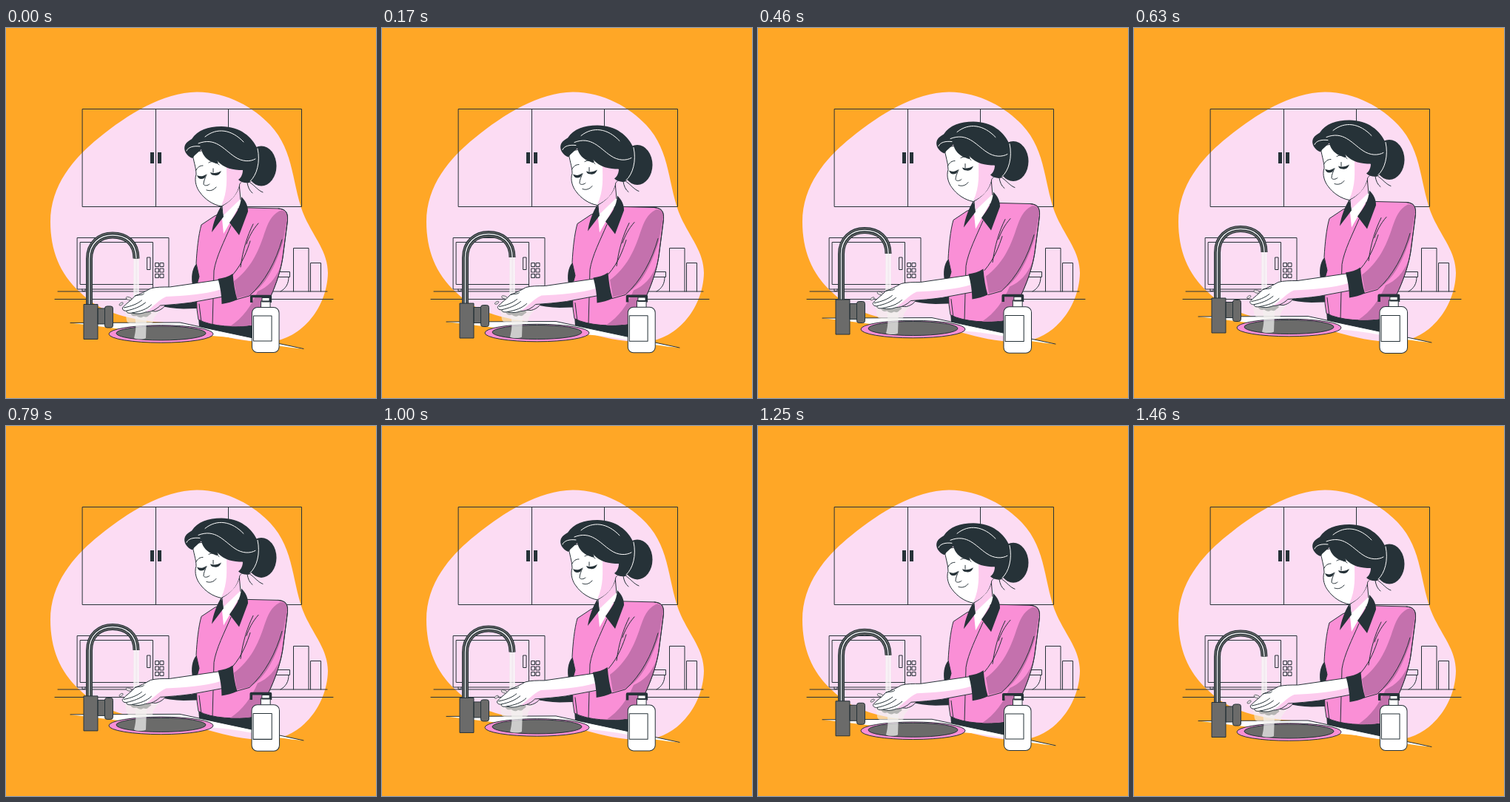
Recreate the animation shown at these times as an HTML page. Size 500 by 500 pixels, loop 1500 ms.

```html
<!DOCTYPE html>
<html lang="en">
<head>
<meta charset="utf-8">
<title>Washing hands</title>
<style>
html, body { margin: 0; width: 100%; height: 100%; overflow: hidden; background: #ffa726; }
svg { display: block; width: 100vw; height: 100vh; }
.ln { fill: none; stroke: #263238; stroke-width: 1; stroke-linecap: round; stroke-linejoin: round; }
.ol { stroke: #263238; stroke-width: 1; stroke-linejoin: round; }
.hi { fill: none; stroke: #fff; stroke-width: 1; stroke-linecap: round; }
.dark { fill: #263238; }
.white { fill: #fff; }
.pink { fill: #fa8fd6; }
.pale { fill: #fcdcf3; }
.blush { fill: #fdcbee; }
.shade { fill: #c471ad; }
.grey { fill: #6b6b6a; }
</style>
</head>
<body>
<svg viewBox="0 0 500 500">
  <rect width="500" height="500" fill="#ffa726"/>
  <path class="pale" d="M258 86.5C300 86.5 335 108 357 131C391 167 386 215 404 256C417 284 435 303 435 331C434 380 396 424 352 424C290 424 262 400 200 397C150 391 122 379 100 357C72 332 60 299 60 262C60 213 91 176 126 148C164 117 212 87 258 86.5Z"/>

  <g id="room" class="ln">
    <path d="M103.500 109.5H399.5V241.5H103.5ZM202.500 109.5V241.5M300.500 109.5V241.5"/>
    <path d="M96.500 283.5H220V353H96.500ZM100.500 289.5H198.500V346.5H100.500ZM198.500 346.5V353M191 310H195V326.500H191ZM103 353V355.500H107V353M208 353V355.500H212V353"/>
    <path d="M70 356H434M66 366.500H442"/>
    <path d="M364 329.500H383.500V336.500H364M382 336.500C382 346 378 352 371 356"/>
    <path d="M388.500 356V297.500H409V356M411.500 356V317.500H425.500V356"/>
  </g>
  <path class="dark" d="M195 168h5v15h-5zM205 168h5v15h-5z"/>

  <g id="scene">
    <!-- far arm -->
    <path class="dark" d="M257 319C251 326 250 338 252 347L261 345V320Z"/>
    <path class="dark" d="M206 374L290 364L290 378L240 379.500C228 379 214 378 206 374Z"/>

    <!-- body -->
    <path class="dark" d="M260 390L340 398V424L261 404Z"/>
    <path class="pink ol" d="M264 266L282 254L300 246L326 243L368 244C378 245 381 249 380.500 260L374 310C369 343 350 384 334 402C312 405 278 404 260 394L258 380L257 350L261 336L257 318C258 300 260 280 264 266Z"/>
    <path class="shade" d="M380 258C380.500 249 377 245.500 370 247C358 253 354 264 349 278C341 303 330 326 308 342L312 365L329 361C350 350 364 322 374 290Z"/>
    <path class="shade" d="M340 356C332 375 320 392 303 403C314 403.500 324 403 334 401C349 385 364 355 371 322C364 340 354 350 340 356Z"/>
    <path class="ln" d="M304 267C295 288 284 309 281 328L279 402M334 265C326 281 320 300 317 323M341 264C333 273 328 283 325 292M306 334C320 318 326 300 330 288M373 286C365 315 350 343 329 362L311 367M261 373L264 398"/>
    <path class="ln" d="M368 244C378 245 381 249 380.500 260L374 310C369 343 350 384 334 402"/>

    <!-- neck -->
    <path class="white" d="M292 228L317 208L318 236L294 278L292 258Z"/>
    <path class="blush" d="M292 236L298 190L318 207L317 231L294 253Z"/>
    <path class="ln" d="M292 240L293 253M315 210L317 232"/>
    <path class="dark" d="M291 240L294 255L278 276C280 263 285 250 291 240ZM318 228C324 234 327 240 327 248L315 280L302 263C310 252 317 243 318 228Z"/>

    <!-- head -->
    <path class="white ol" d="M252 168C253 180 257 188 257 198C254 207 258 217 262 222C269 232 280 239 291 241C302 235 313 226 316 210C323 206 324 196 318 190L300 160Z"/>
    <path class="blush" d="M298 188C298 204 300 220 291 240C303 235 313 226 315.500 210C323 206 324 196 318 190Z"/>
    <ellipse class="dark" cx="345" cy="186.500" rx="20.500" ry="27"/>
    <path class="dark" d="M252 176C244 173 239 165 242 158C244 154 248 152 251 150C259 138 273 133 291 133C316 133 333 147 340 164C343 185 339 202 329 209C324 210 318 209 314 205C318 202 320 197 320 192C307 192 295 190 285 179C289 184 285 184 281 182C272 179 266 173 264 164C260 168 255 171 252 176Z"/>
    <path class="hi" d="M244 166C246 161 253 159 262 160M260 156C283 147 294 164 309 174C319 181 330 181 337 177M269 147C285 134 305 137 321 154M340 163C344 181 339 199 330 207"/>
    <path class="ln" d="M326 209C327 215 329 220 333 223M330 209C336 213 341 220 347 222M257 192C259 188 262 186 266 186M274 182C279 179 284 181 288 185M271 198C269 203 267 207 267 211C268 214 273 213 275 211M271 219C276 221 281 219 284 215M280 195V190"/>
    <path class="dark" d="M258 199C262 201 266 201 270 198C270 201 268 204 264 204C261 204 259 202 258 199ZM276 195C281 197 286 196 291 193C289 198 286 200 282 199C279 199 277 198 276 195Z"/>

    <!-- worktop and sink -->
    <path class="white" d="M87 398.500L235 398L402 433.500C380 432 360 428 335 423.500C309 419 296 417 278 416L165 408Z"/>
    <path class="ln" d="M87 398.500L235 398L402 433.500"/>
    <ellipse class="pink ol" cx="209.500" cy="413.500" rx="70.500" ry="11.800"/>
    <ellipse class="grey ol" cx="209.500" cy="412.500" rx="60.500" ry="9.500"/>

    <!-- running water -->
    <path d="M172.500 308H179.500L180 366H172ZM174 390H190L189 419C185 421 177 421 173 419C176 408 176 400 174 390Z" fill="#f2f2f2" opacity=".72"/>
    <path class="hi" d="M174 311V362M178.500 311V362" opacity=".7"/>

    <!-- near arm -->
    <g id="arm">
      <path d="M160 383C163 390 161 394 164 398C175 403 190 402 198 398C198 390 203 389 208 380L198 374H170Z" fill="#f4f0ee" opacity=".62"/>
      <path class="blush ol" d="M173 375C185 380 194 383 202 383C210 381 214 377 217 371L198 368Z"/>
      <path d="M163 384C167 380 194 380 196 385C195 388 193 387 192 389C189 392 187 390 185 390C181 393 178 390 176 389C172 390 169 389 168 386Z" fill="#b5b5b3"/>
      <path class="white" d="M290 340L221 350C211 350 202 350 195 352C188 356 180 360 174 362C170 367 161 373 157 378C156 381 160 383 163 382C161 385 166 386 170 385C177 387 183 386 188 384C196 384 203 380 208 375C222 374 236 373 250 371L293 363Z"/>
      <path class="blush" d="M293 363L250 371L208 375C203 380 196 384 188 384C197 378 205 368 216 363C240 362 268 360 291 353Z"/>
      <path class="ln" d="M290 340L221 350C211 350 202 350 195 352C188 356 180 360 174 362C170 367 161 373 157 378C156 381 160 383 163 382C161 385 166 386 170 385C177 387 183 386 188 384C196 384 203 380 208 375C222 374 236 373 250 371L293 363"/>
      <path class="ln" d="M163 382C172 380 181 377 188 371M170 385C181 383 190 380 196 374M174 362C179 360 183 362 186 359M159 378C169 376 177 373 183 368"/>
      <path class="dark" d="M286 339C293 338 300 336 306 332C307 345 309 357 312 367C306 370 298 372 291 373C291 361 289 350 286 339Z"/>
    </g>
    <g id="drops" fill="#e6dce3" class="ol" style="stroke-width:.6">
      <ellipse cx="165.500" cy="365.500" rx="4" ry="2" transform="rotate(18 165 365)"/>
      <ellipse cx="155" cy="373" rx="3" ry="1.500" transform="rotate(-32 155 373)"/>
    </g>

    <!-- tap -->
    <g id="tap" fill="none"></g>
    <path class="grey ol" d="M124 379H135V400H124ZM105 373.500H124V420.500H105Z"/>
    <rect class="grey ol" x="133.500" y="376" width="11" height="29" rx="3"/>
  </g>

  <g id="bottle">
    <path class="dark" d="M330 371V363Q330 361 332 361H357Q359 361 359 363V371H355V364.500H333.500V371Z"/>
    <path class="white ol" d="M346 364.500H356V370H346ZM344.500 369H357V378H344.500Z"/>
    <rect class="white ol" x="332.500" y="377.500" width="36.500" height="61" rx="7.500"/>
    <rect class="ln" x="334.500" y="389" width="24.500" height="34"/>
  </g>
</svg>
<script>
const LOOP = 1500;
const NS = "http://www.w3.org/2000/svg";
const $ = id => document.getElementById(id);

function add(parent, tag, attrs) {
  const el = document.createElementNS(NS, tag);
  for (const key in attrs) el.setAttribute(key, attrs[key]);
  parent.appendChild(el);
}

// Microwave keypad
for (let i = 0; i < 6; i++) {
  add($("room"), "rect", {
    x: 202 + 6.5 * (i % 2), y: 317.5 + 7.5 * (i >> 1), width: 4.5, height: 5
  });
}

// Tap pipe: layered strokes along one curve
const pipe = "M112.500 374V312C112.500 291 127 280 144 280C162 280 176 290 176 311.500";
for (const [stroke, width] of [["#263238", 9], ["#6b6b6a", 6.8], ["#263238", 4.2], ["#e8e8e8", 1.5]]) {
  add($("tap"), "path", { d: pipe, stroke, "stroke-width": width });
}

const wave = p => (1 - Math.cos(2 * Math.PI * p)) / 2;

function draw(ms) {
  const p = (ms % LOOP) / LOOP;
  const lift = wave(p + 0.02);
  const rub = Math.cos(4 * Math.PI * p);
  const size = 1 + 0.03 * wave(p + 0.1);
  $("scene").setAttribute("transform", `translate(0 ${-8.8 * lift})`);
  $("arm").setAttribute("transform", `translate(${1.2 * rub - 0.7} 0)`);
  $("drops").setAttribute("transform", `translate(${0.6 * rub} ${-lift})`);
  $("bottle").setAttribute("transform",
    `translate(350.700 408) scale(${size}) translate(-350.700 -408)`);
}

const start = performance.now();
function tick() {
  draw(performance.now() - start);
  requestAnimationFrame(tick);
}
draw(0);
requestAnimationFrame(tick);
</script>
</body>
</html>
```
